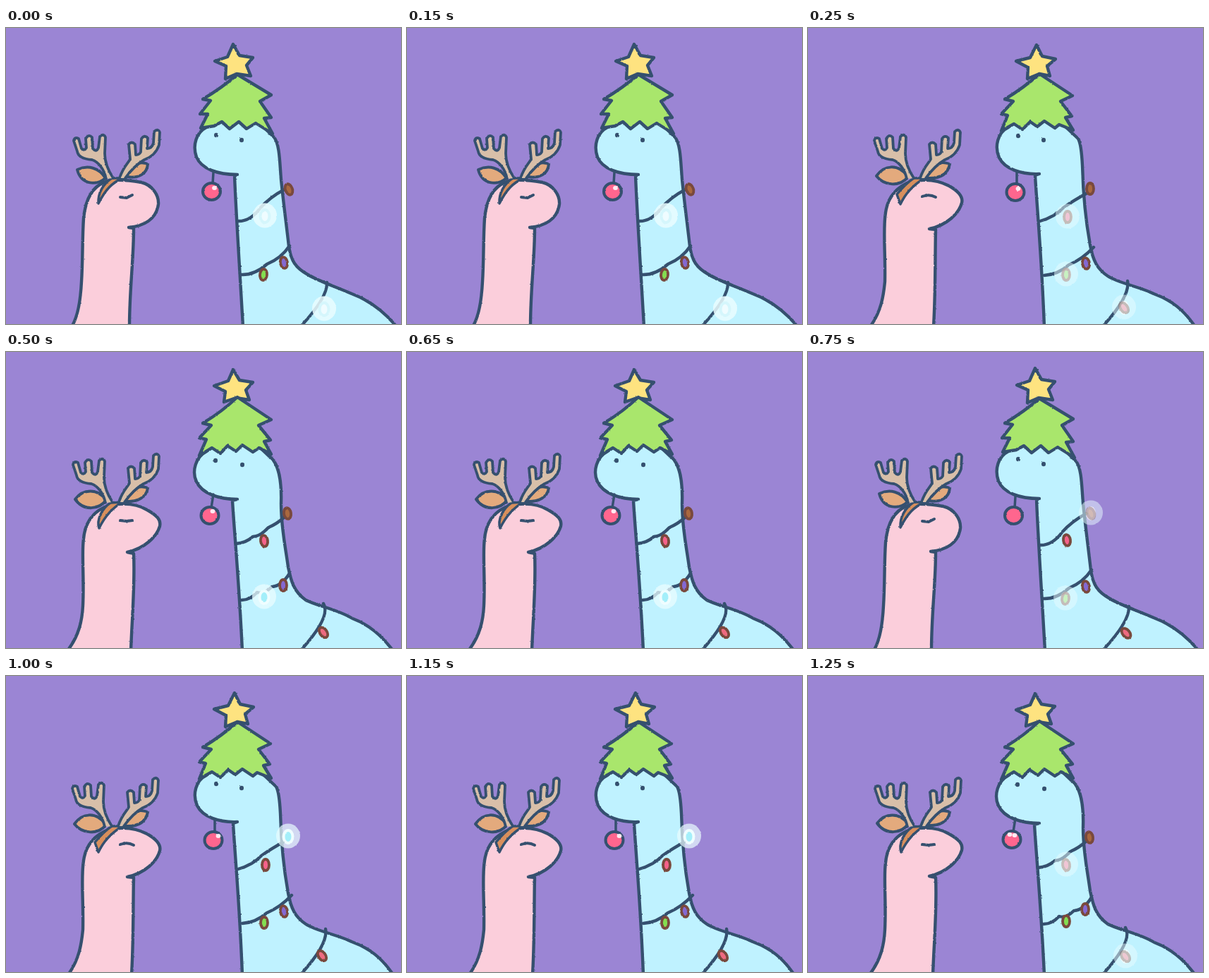
Recreate the animation shown at these times as an HTML page. Size 560x420 px, loop 1500 ms.

```html
<!DOCTYPE html>
<html lang="en">
<head>
<meta charset="utf-8">
<title>Festive dinosaurs</title>
<style>
  html, body { margin: 0; width: 100%; height: 100%; overflow: hidden; background: #9b85d4; }
  svg { display: block; width: 100%; height: 100%; }
</style>
</head>
<body>
<svg id="stage" viewBox="0 0 560 420">
  <defs>
    <filter id="crayon" filterUnits="userSpaceOnUse" x="0" y="0" width="560" height="420" color-interpolation-filters="sRGB">
      <feTurbulence type="fractalNoise" baseFrequency=".3" numOctaves="2" seed="4"/>
      <feDisplacementMap in="SourceGraphic" scale="2" xChannelSelector="R" yChannelSelector="G"/>
    </filter>
  </defs>
  <rect width="560" height="420" fill="#9b85d4"/>
  <g id="scene"></g>
</svg>
<script>
const STEP = 250;
const INK = '#35506f';
const BULB_COLORS = ['#a9683f', '#f5628a', '#8468d2', '#84dd50', '#ee6a80'];

const ANTLERS = 'M142 214C139 200 131 190 122 187C110 186 102 182 101 175L96 160Q97 154 103 157L107 171Q111 175 114 170L113 157Q117 150 122 155L123 171Q128 177 131 170L133 154Q138 149 141 155L140 178Q140 195 152 213'
  + 'M161 213C166 197 174 191 176 186L174 165Q178 160 183 165L184 180Q189 180 191 176L192 157Q196 151 201 156L200 171Q207 171 209 163L210 147Q215 142 218 148L217 166Q212 181 196 187Q182 195 169 213';

const poses = [
  {
    body: 'M554 424C536 402 514 386 490 377C465 366 445 360 428 350C410 340 404 330 401 310C397 275 393 245 390 215C388 190 388 165 380 155L352 128H296L284 141C270 148 264 166 270 183C277 200 300 208 328 208L324 210C326 260 330 320 336 424',
    tree: 'M328 66L376 95L360 104L376 127L366 128L378 150L354 135L341 143L330 133L317 143L306 133L295 139L276 142L286 122L275 122L290 103L279 101Q306 85 328 66Z',
    star: 'M322 23L331 39L350 42L341 53L347 68L327 65L311 72L312 54L296 47L314 41Z',
    eyes: [[298, 152], [334, 159]],
    string: 'M294 205L293 221',
    ball: [291.5, 232],
    garland: 'M328 274Q346 275 360 256Q374 240 395 229M333 350Q352 351 370 335Q390 327 402 309M455 361Q456 382 420 421',
    bulbs: [[401, 229, -20], [367, 267, -8], [394, 333, -10], [365, 350, 5], [451, 399, -40]],
    pink: 'M93 424C103 408 106 380 107 360C109 330 108 300 110 270C113 240 125 222 145 217C160 214 180 217 192 219C208 223 217 238 216 250C213 272 195 281 174 283L181 284C181 330 175 370 175 424',
    wink: 'M162 240L171 241L179 237',
    ears: 'M101 201C116 194 132 198 141 213C130 223 107 224 101 201ZM171 210C176 194 189 188 201 193C200 207 188 214 171 211Z',
    antlerShift: 0,
    band: 'M131 249C130 234 138 221 150 213L166 213C150 219 140 231 131 249Z'
  },
  {
    body: 'M549 424C533 400 515 386 490 377C470 367 440 362 425 352C410 342 404 330 400 308C394 275 390 240 389 195C388 175 386 162 383 157L352 128H296L284 141C269 148 264 168 271 184C279 200 302 208 328 207L322 209C325 260 331 320 335 424',
    tree: 'M328 65L375 96L358 104L374 125L365 127L376 145L356 137L350 142L335 132L325 140L315 133L304 144L292 136L274 146L283 124L274 122L291 104L279 101Q306 85 328 65Z',
    star: 'M324 24L332 40L351 44L339 54L343 68L328 65L311 72L312 56L295 47L315 42Z',
    eyes: [[298, 153], [334, 159]],
    string: 'M296 204L296 221',
    ball: [294, 233],
    garland: 'M329 274Q350 268 362 255Q376 245 396 234M335 351Q354 350 370 336Q389 328 405 311M453 359Q457 380 420 421',
    bulbs: [[400, 228, 0], [368, 268, 0], [394, 334, -8], [366, 350, 0], [448, 397, -35]],
    pink: 'M88 424C104 402 107 380 109 360C110 320 106 285 110 262C113 240 125 226 145 218C165 214 185 216 200 224C214 232 220 240 218 248C214 263 197 280 172 285L181 286C180 330 181 370 178 424',
    wink: 'M162 239Q172 235 181 240',
    ears: 'M97 210C108 194 128 192 142 211C130 226 108 224 97 210ZM168 211C176 193 188 188 201 193C198 208 186 214 169 213Z',
    antlerShift: -2,
    band: 'M131 250L126 236Q138 221 150 213L165 213Q141 228 131 250Z'
  },
  {
    body: 'M549 424C532 402 515 387 491 378C470 365 440 360 425 352C408 340 404 325 400 305C396 275 390 250 390 215C391 185 387 156 372 147L352 128H296L284 141C269 149 263 169 270 184C278 201 302 209 328 209L321 211C324 260 330 320 335 424',
    tree: 'M328 64L376 96L358 104L375 125L366 127L376 145L359 136L350 142L335 132L326 141L314 133L304 144L292 136L274 147L284 124L274 122L291 104L279 101Q306 85 328 64Z',
    star: 'M322 25L331 40L350 43L340 54L345 68L326 65L309 71L311 56L295 48L315 41Z',
    eyes: [[297, 154], [335, 160]],
    string: 'M294 202L291 221',
    ball: [289, 232],
    garland: 'M326 272Q340 271 350 262Q360 262 372 249Q384 244 395 234M334 352Q346 352 356 341Q366 344 377 333Q391 332 402 314M450 357Q461 375 420 421',
    bulbs: [[399, 229, -8], [366, 268, -8], [393, 331, 0], [366, 348, 0], [450, 398, -35]],
    pink: 'M87 424C104 402 108 380 109 360C111 320 107 285 110 265C112 242 123 226 145 218C165 214 185 215 200 224C214 232 220 238 218 247C214 262 196 279 172 284L181 286C183 330 179 370 177 424',
    wink: 'M162 239L171 240L179 239',
    ears: 'M98 209C109 194 130 193 142 210C132 224 110 226 98 209ZM169 210C178 193 189 188 201 193C199 206 187 213 170 212Z',
    antlerShift: -1,
    band: 'M132 250C128 238 136 222 148 214L165 213Q144 225 132 250Z'
  }
];

// Each lit bulb: index and brightness; each ball shine: offsets from its centre.
const moments = [
  { lit: { 1: .85, 4: .85 }, shine: [[4, -5]] },
  { lit: { 1: .5, 3: .5, 4: .5 }, shine: [[4, -5]] },
  { lit: { 3: .75 }, shine: [[4, -6]] },
  { lit: { 0: .5, 3: .5 }, shine: [] },
  { lit: { 0: .7 }, shine: [[7, -6]] },
  { lit: { 1: .5, 4: .5 }, shine: [[-3, -7], [4, -6]] }
];

const path = (d, fill, width = 4.4) =>
  `<path d="${d}" fill="${fill}" stroke="${INK}" stroke-width="${width}" stroke-linecap="round" stroke-linejoin="round"/>`;
const oval = (x, y, rx, ry, attrs) =>
  `<ellipse cx="${x}" cy="${y}" rx="${rx}" ry="${ry}" ${attrs}/>`;

function bulb([x, y, tilt], i, glow = 0) {
  const shell = opacity => oval(x, y, 5, 8, `fill="${BULB_COLORS[i]}" stroke="#79493d" stroke-width="3.8" opacity="${opacity}" transform="rotate(${tilt} ${x} ${y})"`);
  if (!glow) return shell(1);
  const bright = glow > .6;
  const halo = oval(x, y - 1, 17, 17.5, `fill="#eafdff" opacity="${glow}"`);
  if (!bright) {
    return halo + oval(x, y, 7, 10, 'fill="#fff" opacity=".6"') + shell(.35);
  }
  const [core, ring] = glow > .8 ? ['#effcff', '#d5f6fc'] : ['#a4effa', '#effdff'];
  return halo + oval(x, y, 6.5, 9, `fill="${core}" stroke="${ring}" stroke-width="4"`);
}

function drawPink(p) {
  return path(p.pink, '#fbcedb')
    + path(p.ears, '#e3aa7d', 4)
    + path(p.band, '#d88f5c', 3.5)
    + `<g transform="translate(${p.antlerShift})">${path(ANTLERS, '#d8bfa9', 3.8)}</g>`
    + path(p.wink, 'none', 4);
}

function drawBlue(p, shine) {
  const [x, y] = p.ball;
  return path(p.body, '#bff2ff')
    + path(p.star, '#fee380')
    + path(p.tree, '#a9e66c')
    + p.eyes.map(([ex, ey]) => oval(ex, ey, 3, 3.2, `fill="${INK}"`)).join('')
    + path(p.string, 'none', 3.5)
    + oval(x, y, 12.5, 12, `fill="#ff668e" stroke="${INK}" stroke-width="4"`)
    + shine.map(([dx, dy]) => oval(x + dx, y + dy, 3.4, 3, 'fill="#ffeaf2"')).join('')
    + path(p.garland, 'none');
}

const scene = document.getElementById('scene');
let shown = -1;

function render(time) {
  const index = Math.floor(time / STEP) % moments.length;
  if (index === shown) return;
  shown = index;
  const pose = poses[index % poses.length];
  const { lit, shine } = moments[index];
  const bulbs = pose.bulbs.map((b, i) => bulb(b, i, lit[i])).join('');
  scene.innerHTML = `<g filter="url(#crayon)">${drawPink(pose)}${drawBlue(pose, shine)}${bulbs}</g>`;
}

const start = performance.now();
function tick() {
  render(performance.now() - start);
  requestAnimationFrame(tick);
}
tick();
</script>
</body>
</html>
```
